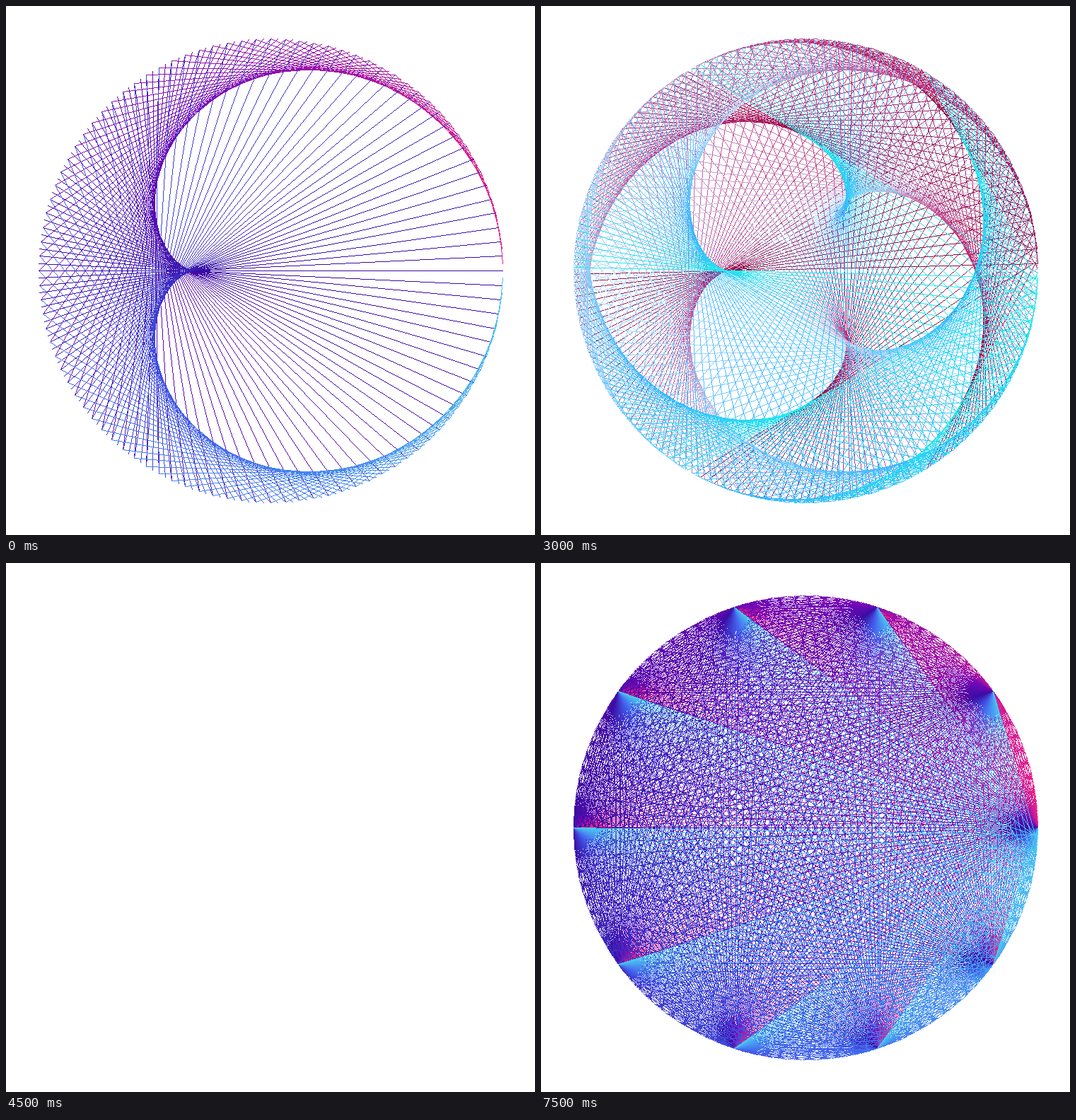
Write an HTML page with a canvas that moves like this. It is 748 px wide and 748 px high and loops after 8 s.

```html
<!DOCTYPE html>
<html>
<head>
<meta charset="utf-8">
<title>Times tables on a circle</title>
<style>
  html, body { margin: 0; width: 100%; height: 100%; overflow: hidden; background: #fff; }
  canvas { display: block; }
</style>
</head>
<body>
<canvas id="stage" width="748" height="748"></canvas>
<script>
const SIZE = 748, CENTER = 374, RADIUS = 328;
const LOOP = 8000, HOLD = 1500;

const NEON = ['#f72585', '#7209b7', '#3a0ca3', '#4361ee', '#4cc9f0'];
const OCEAN = ['#caf0f8', '#00a8e8', '#00171f', '#003459', '#007ea7'];
const CANDY = ['#8d0a3c', '#c8337f', '#bfdcf9', '#38b6ff', '#20f0ec'];
const EMBER = ['#1c0507', '#e4261a', '#f0a02c', '#fad45a', '#fff6d8'];

// Each point i of the circle is joined to point i * factor (mod points).
const scenes = [
  { points: 200, factor: 2, palette: NEON },
  { points: 330, factor: 67, palette: OCEAN },
  { points: 597, factor: 100, palette: CANDY },
  { points: 99, factor: 100, palette: OCEAN },
  { points: 561, factor: 100, palette: EMBER },
  { points: 1000, factor: 100, palette: NEON }
];

const ctx = document.getElementById('stage').getContext('2d');
const image = ctx.createImageData(SIZE, SIZE);
const pixels = new Uint32Array(image.data.buffer);

const channels = hex => [1, 3, 5].map(k => parseInt(hex.slice(k, k + 2), 16));

function paletteColor(palette, t) {
  const position = t * (palette.length - 1);
  const index = Math.floor(position);
  const from = channels(palette[index]), to = channels(palette[index + 1]);
  const [r, g, b] = from.map((v, k) => Math.round(v + (to[k] - v) * (position - index)));
  return (0xff000000 | b << 16 | g << 8 | r) >>> 0;
}

function pointAt(turn) {
  const angle = turn * 2 * Math.PI;
  return [
    Math.round(CENTER + RADIUS * Math.cos(angle)),
    Math.round(CENTER - RADIUS * Math.sin(angle))
  ];
}

// Hard-edged line, one pixel wide.
function drawLine([x0, y0], [x1, y1], color) {
  const steps = Math.max(Math.abs(x1 - x0), Math.abs(y1 - y0));
  if (steps === 0) return;
  for (let s = 0; s <= steps; s++) {
    const x = Math.round(x0 + (x1 - x0) * s / steps);
    const y = Math.round(y0 + (y1 - y0) * s / steps);
    pixels[y * SIZE + x] = color;
  }
}

function drawScene({ points, factor, palette }) {
  pixels.fill(0xffffffff);
  for (let i = 0; i < points; i++) {
    const target = i * factor % points;
    drawLine(pointAt(i / points), pointAt(target / points), paletteColor(palette, i / points));
  }
  ctx.putImageData(image, 0, 0);
}

const start = performance.now();
let shown = -1;

function tick() {
  const time = (performance.now() - start) % LOOP;
  const current = Math.floor(time / HOLD);
  if (current !== shown) {
    shown = current;
    drawScene(scenes[current]);
  }
  requestAnimationFrame(tick);
}
tick();
</script>
</body>
</html>
```
